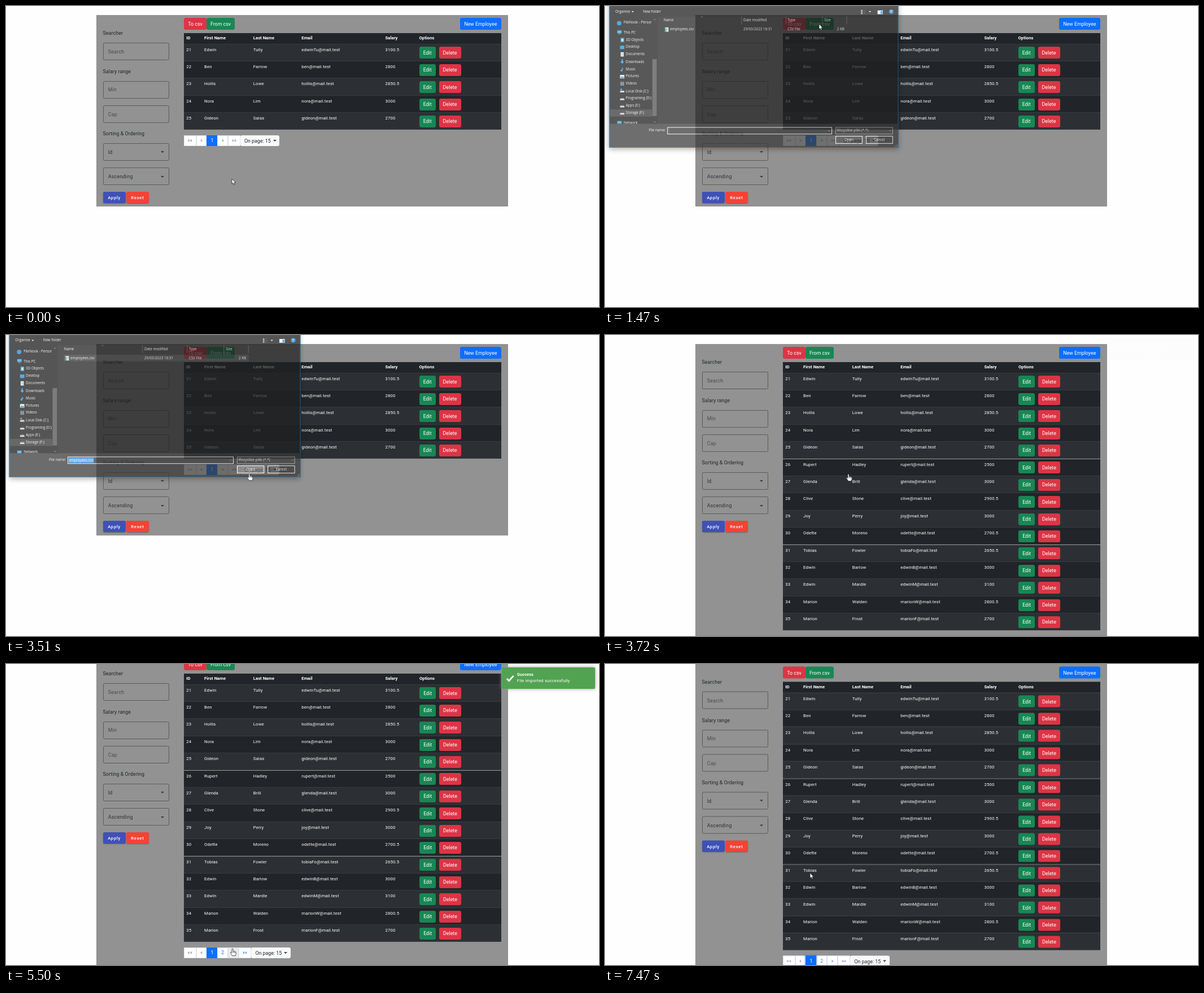
These frames come from a looping animation (1050 px wide and 533 px high, 7540 ms). An HTML page:

```html
<!DOCTYPE html>
<html lang="en">
<head>
<meta charset="utf-8">
<title>Employee import</title>
<style>
html, body { margin: 0; width: 100%; height: 100%; overflow: hidden; background: #fefefe; }
#stage { position: absolute; left: 0; top: 0; width: 1050px; height: 533px; overflow: hidden; font: 8.85px Roboto, sans-serif; color: #212529; }
#page, #dialog, #toast, #cursor { position: absolute; left: 0; top: 0; width: 1050px; }
.t, .b, svg { position: absolute; font-style: normal; font-weight: 400; box-sizing: border-box; }
.t { line-height: 20px; margin-top: -10px; }
.b { display: flex; align-items: center; justify-content: center; }
.right { transform: translateX(-100%); }

#panel { background: #929292; }
.label { letter-spacing: .083px; }
.field { border: .6px solid #5b5b5b; border-radius: 2.2px; }
.hint { letter-spacing: .277px; color: #4b4b4b; }
.value { letter-spacing: .277px; color: #303030; }
.caret { border: 3px solid transparent; border-top-color: #3a3a3a; border-bottom: 0; }
.btn { color: #fff; border-radius: 3.3px; }
.red { background: #dc3545; }
.green { background: #198754; }
.green.hover { background: #157347; }
.blue { background: #0d6efd; }
.mat { color: #fff; font-size: 7.74px; font-weight: 500; letter-spacing: .69px; border-radius: 2.2px; box-shadow: 0 1.5px 1.5px -1px #0003, 0 1px 2px #0003; }
.apply { background: #3f51b5; }
.reset { background: #f44336; }
.cell, .head { color: #fff; font-size: 7.74px; letter-spacing: .138px; }
.head { font-weight: 700; letter-spacing: 0; }
.row { background: #212529; border-bottom: .55px solid #373b3e; }
.row.odd { background: #2c3034; }
.link { background: #fff; border: .55px solid #dee2e6; color: #0d6efd; }
.link.off { color: #6c757d; }
.link.hover { background: #e9ecef; }
.link.on { background: #0d6efd; border-color: #0d6efd; color: #fff; }
.shift .link { color: #6570d8; }
.shift .link.off { color: #747bbd; }
.shift .link.on { color: #fff; box-shadow: 0 0 0 2.2px #0d6efd40; z-index: 1; }
.drop { background: #f8f9fa; border-radius: 3.3px; }

#dialog { height: 533px; transform-origin: 263.5px 95px; font: 6.4px "Open Sans", "Noto Sans", sans-serif; color: #f2f2f2; }
.frame { background: #202020; border: 1px solid #1176bd; box-shadow: 0 3px 9px #0006; }
.bar, .nav { background: #191919; }
.foot { background: #383838; }
.thumb { background: #4d4d4d; }
.mark { background: #333; }
.pick { background: #555; }
.line { background: #555; }
.entry { border: .8px solid #aaa; }
.entry.lit { border-color: #fff; }
.press { border: 1.2px solid #fff; background: #333; }
.press.thin { border-width: .9px; }
.press.hover { background: #666; }
.sel { background: #3297fd; color: #fff; }
.cloud { background: #1b86d8; border-radius: 50%; }
.help { background: #1683d8; border-radius: 50%; font-weight: 700; }
.clip { overflow: hidden; }

.note { background: #51a351; border-radius: 1.7px; box-shadow: 0 0 6.6px #999; }
</style>
</head>
<body>
<div id="stage">
  <div id="page"></div>
  <div id="dialog"></div>
  <div id="toast"></div>
  <div id="cursor"></div>
</div>
<script>
const LOOP = 7540;
const PITCH = 30.4;
const $ = id => document.getElementById(id);

const text = (x, y, s, cls = '') => `<i class="t ${cls}" style="left:${x}px;top:${y}px">${s}</i>`;
const box = (x, y, w, h, cls = '', s = '') =>
  `<b class="b ${cls}" style="left:${x}px;top:${y}px;width:${w}px;height:${h}px">${s}</b>`;
const icon = (x, y, size, shapes) =>
  `<svg style="left:${x}px;top:${y}px" width="${size}" height="${size}" viewBox="0 0 16 16">${shapes}</svg>`;

const parse = s => s.trim().split('\n').map(r => r.trim().split(' '));
const first = parse(`
  Edwin Tully edwinTu 3100.5
  Ben Farrow ben 2800
  Hollis Lowe hollis 2850.5
  Nora Lim nora 3000
  Gideon Salas gideon 2700
  Rupert Hadley rupert 2500
  Glenda Brill glenda 3000
  Clive Stone clive 2900.5
  Joy Perry joy 3000
  Odette Moreno odette 2700.5
  Tobias Fowler tobiaFo 2650.5
  Edwin Barlow edwinB 3000
  Edwin Mardle edwinM 3100
  Marion Walden marionW 2800.5
  Marion Frost marionF 2700`);
const second = parse(`
  Lionel Marsh lionel 2900
  Tessa Quill tessa 3050.5
  Harvey Lunt harvey 2600
  Della Birch della 3000
  Rowan Pike rowan 2750.5
  Ivy Thorne ivy 2800
  Felix Garland felix 3100
  Nadia Crowe nadia 2650
  Percy Holm percy 2950.5
  Wendy Larch wendy 2700`);

const views = {
  few: { rows: first.slice(0, 5), id: 21, page: 1, pages: 1 },
  many: { rows: first, id: 21, page: 1, pages: 2 },
  next: { rows: second, id: 36, page: 2, pages: 2 },
  back: { rows: first, id: 21, page: 1, pages: 2, cls: 'shift' }
};

function sidebar() {
  const fields = [[65.3, 'Search'], [132.7, 'Min'], [176, 'Cap'], [243.2, 'Id'], [286.3, 'Ascending']];
  return text(171.5, 48, 'Searcher', 'label') + text(171.5, 115.7, 'Salary range', 'label') +
    text(171.5, 226, 'Sorting &amp; Ordering', 'label') +
    fields.map(([y, s], i) => box(171.5, y, 117.5, 31, 'field') +
      text(180.7, y + 15.5, s, i < 3 ? 'hint' : 'value') +
      (i < 3 ? '' : box(274.3, y + 14.2, 6, 3, 'caret'))).join('') +
    box(171.5, 329, 40.3, 20, 'mat apply', 'Apply') + box(212.5, 329, 40.7, 20, 'mat reset', 'Reset');
}

function pager(v, y, hover) {
  const labels = ['««', '«', ...Array.from({ length: v.pages }, (_, i) => `${i + 1}`), '»', '»»'];
  let x = 315, out = '';
  labels.forEach((s, i) => {
    const w = s.length > 1 ? 21.5 : 19;
    const off = i < 2 ? v.page === 1 : i >= labels.length - 2 && v.page === v.pages;
    const cls = s === `${v.page}` ? 'on' : off ? 'off' : s === hover ? 'hover' : '';
    out += box(x, y, w, 19, 'link ' + cls, s);
    x += w - (s.length > 1 ? 0 : .1);
  });
  x += v.pages > 1 ? .8 : .2;
  return out + box(x, y, 69.5, 19.3, 'drop') + text(x + 7, y + 10, 'On page: 15') +
    box(x + 57.8, y + 8.6, 5, 2.6, 'caret');
}

function drawPage(name, hover) {
  const v = views[name];
  const end = 67.5 + v.rows.length * PITCH;
  const bottom = end > 313.5 ? end + 41 : 354.5;
  const opt = v.pages > 1 ? 732 : 731.5;
  const cols = [319.3, 351, 437.8, 523.3, 671.6];
  let out = `<b class="b" id="panel" style="left:160px;top:15.5px;width:729px;height:${bottom - 15.5}px"></b>` + sidebar();
  out += box(315, 21, 40, 21, 'btn red', 'To csv') +
    box(355, 21, 50, 21, 'btn green ' + (hover === 'csv' ? 'hover' : ''), 'From csv') +
    box(804, 21, 72.5, 21, 'btn blue', 'New Employee') + box(315, 47.5, 561.5, 20, 'row');
  ['ID', 'First Name', 'Last Name', 'Email', 'Salary', 'Options'].forEach((s, i) => {
    out += text(i < 5 ? cols[i] : opt, 57.3, s, 'head');
  });
  v.rows.forEach(([given, family, box1, pay], i) => {
    const y = 67.5 + i * PITCH;
    out += box(315, y, 561.5, PITCH, i % 2 ? 'row' : 'row odd');
    [v.id + i, given, family, box1 + '@mail.test', pay].forEach((s, k) => out += text(cols[k], y + 10, s, 'cell'));
    out += box(opt, y + 4.8, 29.3, 21, 'btn green', 'Edit') + box(opt + 35, y + 4.8, 39, 21, 'btn red', 'Delete');
  });
  $('page').className = v.cls || '';
  $('page').innerHTML = out + pager(v, end + 9, hover);
}

const disk = '<path d="M3 6h10l2 4H1z" fill="#777"/><path d="M1 9h14v4H1z" fill="#ddd"/>';
const screenIcon = '<path d="M1 2h14v9H1z" fill="#35a7ee"/><path d="M4 13h8v1H4z" fill="#cde"/>';
const places = [
  ['This PC', screenIcon],
  ['3D Objects', '<path d="M3 1h11v14H3z" fill="#2aa5d8"/><path d="M6 5h5v6H6z" fill="#dff6ff"/>'],
  ['Desktop', '<path d="M1 3h14v11H1z" fill="#1692e4"/>'],
  ['Documents', '<path d="M3 1h10v14H3z" fill="#e8eef2"/><path d="M5 5h6M5 8h6M5 11h6" stroke="#4a87a8"/>'],
  ['Downloads', '<path d="M6 1h4v7h4l-6 7-6-7h4z" fill="#2b9df0"/>'],
  ['Music', '<path d="M7 1c1 4 6 4 5 9-1-3-3-3-3-3v5a3 3 0 1 1-2-3z" fill="#2b9df0"/>'],
  ['Pictures', '<path d="M1 3h14v11H1z" fill="#e8eef2"/><path d="M2 12l4-5 4 3 4-2v5H2z" fill="#3189b9"/>'],
  ['Videos', '<path d="M2 2h12v12H2z" fill="#667"/><path d="M4 2v12M12 2v12" stroke="#ccc" stroke-dasharray="2"/><path d="M6 4h4v8H6z" fill="#379"/>'],
  ['Local Disk (C:)', disk + '<path d="M2 1h5v4H2z" fill="#35a7ee"/>'],
  ['Programing (D:)', disk], ['Apps (E:)', disk], ['Storage (F:)', disk]
];
const chevron = (x, y, up) =>
  icon(x, y, 5, `<path d="M2 ${up ? 11 : 5}l6 ${up ? -6 : 6} 6 ${up ? 6 : -6}" fill="none" stroke="#bbb" stroke-width="2"/>`);
const wedge = (x, y) => icon(x, y, 5, '<path d="M1 4h14l-7 8z" fill="#ddd"/>');

function drawDialog(picked, press) {
  let out = box(2.3, -64, 522.7, 318, 'frame') +
    box(3.3, 0, 520.7, 17, 'bar') + box(3.3, 17, 86, 194, 'nav') + box(3.3, 211, 520.7, 42, 'foot') +
    text(13, 8, 'Organise') + wedge(41.5, 6) + text(63, 8, 'New folder') +
    icon(457, 3.5, 9, '<path d="M1 2h4v3H1zm0 5h4v3H1zm0 5h4v3H1zM7 3h2m-2 5h2m-2 5h2M11 3h3m-3 5h3m-3 5h3" fill="#ddd" stroke="#888"/>') +
    wedge(471, 6) + icon(487, 3.5, 10, '<path d="M0 3h16v11H0z" fill="#eee"/><path d="M9 5h6v8H9z" fill="#2290dd"/>') +
    box(507.7, 4, 8, 8, 'help', '?') +
    box(80, 17, 9, 194, 'bar') + box(80.3, 94, 8.2, 103, 'thumb') + chevron(82, 20, 1) + chevron(82, 205) +
    box(15.8, 24.5, 8, 8, 'cloud') + text(28, 28, 'FileNook - Persor') +
    box(3.3, 185.3, 76.7, 12.8, 'mark');
  places.forEach(([s, shapes], i) => {
    const y = 45.6 + i * 13.25;
    out += icon(i ? 20.5 : 16, y - 4.3, 9, shapes) + text(i ? 32 : 28, y, s);
  });
  out += box(3.3, 199, 76, 12, 'clip', icon(12.5, 5.5, 9, screenIcon) + text(24.7, 10, 'Network'));
  if (picked) out += box(99.5, 34.3, 332, 12, picked > 1 ? 'mark' : 'pick');
  [['Name', 100.5], ['Date modified', 244.7], ['Type', 324.5], ['Size', 391]].forEach(([s, x]) => out += text(x, 24, s));
  [241, 320.5, 387, 431.3].forEach(x => out += box(x, 17, .7, 14, 'line'));
  out += chevron(167, 15, 1) +
    icon(101.5, 35.5, 9, '<path d="M2 1h11v14H2z" fill="#d9edf2"/><path d="M1 4h5v11H1z" fill="#4aa06c"/><path d="M7 4h5M7 7h5M7 10h5" stroke="#3e93b5"/>') +
    text(112, 40.3, 'employees.csv') + text(244.7, 40.3, '29/03/2023 16:31') + text(324.5, 40.3, 'CSV File') +
    text(427.3, 40.3, '2 KB', 'right') +
    text(104, 223, 'File name:', 'right') + box(107.3, 216.5, 297.5, 13.3, 'entry lit') + chevron(397, 221) +
    (picked ? box(109, 219, 44.5, 8.6, 'sel', 'employees.csv') : box(109.5, 219, .6, 8.5, 'line')) +
    box(411, 216.5, 104, 13.3, 'entry') + text(413.5, 223, 'Wszystkie pliki (*.*)') + chevron(507.5, 221) +
    box(411, 232.8, 49, 14, 'press ' + (press ? 'hover' : ''), 'Open') + box(466, 232.8, 49, 14, 'press thin', 'Cancel') +
    icon(518, 247, 6, '<path d="M14 2v2M14 7v2M9 7v2M14 12v2M9 12v2M4 12v2" stroke="#bbb" stroke-width="3"/>');
  $('dialog').innerHTML = out;
}

const pointers = {
  arrow: '<path d="M0 0v9.3l2.1-1.9 1.5 3.4 1.6-.7-1.5-3.3h2.9z"/>',
  hand: '<path d="M-1.1 1.2a1.1 1.1 0 0 1 2.2 0v3.3q1.6-.5 2 .4 1.4-.3 1.7.5 1.5-.1 1.5 1.3v2.6l-1.2 3.4h-5.3l-2.8-4.3q-1.2-1.7-.1-2.1 1-.3 2 1.3z"/><path d="M1.2 5v2.2M3 5.5v2M4.7 6v1.6"/>'
};
function drawCursor(kind) {
  $('cursor').innerHTML = `<svg width="1" height="1" overflow="visible" fill="#fff" stroke="#111" stroke-width=".7">${pointers[kind]}</svg>`;
}

$('toast').innerHTML = box(877.7, 6, 165.5, 38, 'note') +
  icon(885, 18, 15, '<path d="M2 8.5l4 4.3L14.5 3" fill="none" stroke="#fff" stroke-width="3"/>') +
  text(904.8, 19, 'Success', 'head') + text(904.8, 29.7, 'File imported successfully', 'cell');

// Each stop is [ms, ...values].
const smooth = k => k * k * (3 - 2 * k);
const flat = k => k;
function at(stops, t, ease = smooth) {
  const i = stops.findIndex(s => s[0] > t);
  if (i < 0) return stops[stops.length - 1].slice(1);
  if (!i) return stops[0].slice(1);
  const a = stops[i - 1], b = stops[i], k = ease((t - a[0]) / (b[0] - a[0]));
  return a.slice(1).map((v, n) => v + (b[n + 1] - v) * k);
}
const within = (t, ...spans) => spans.some(([a, b]) => t >= a && t < b);

const path = [
  [70, 400, 306], [790, 361, 28], [860, 362, 28], [1020, 389, 30], [1200, 379, 32], [1500, 379, 32],
  [2000, 168, 55], [2230, 168, 55], [2340, 140, 41], [2480, 140, 41], [2930, 430, 243], [3510, 430.7, 245],
  [3720, 431, 246], [3860, 442, 266], [4200, 567.5, 306], [4720, 567.5, 306], [5230, 404, 508], [5370, 404, 508],
  [5500, 401, 504], [5720, 401, 504], [6190, 388, 510], [6860, 361, 375], [6940, 363, 370]
];
const dialogMove = [
  [1390, 0, .95], [1470, .72, .979], [1600, 1, 1], [3440, 1, 1], [3510, .74, .987], [3600, 0, .95]
];
const toastFade = [[3720, 0], [3830, 1], [5780, 1], [5950, 0]];
const scroll = [[4440, 0], [4720, 31], [5700, 31], [5700, 16.5]];

const drawn = {};
function update(draw, ...args) {
  const key = args.join();
  if (drawn[draw.name] === key) return;
  drawn[draw.name] = key;
  draw(...args);
}

const start = performance.now();
function tick() {
  const t = (performance.now() - start) % LOOP;
  const view = t < 3720 ? 'few' : t < 5700 ? 'many' : t < 7370 ? 'next' : 'back';
  const hover = within(t, [740, 1600]) ? 'csv' : within(t, [5200, 5700]) ? '»' : within(t, [6900, 7370]) ? '1' : '';
  update(drawPage, view, hover);
  update(drawDialog, t < 2420 ? 0 : t < 2900 ? 1 : 2, within(t, [2880, 3600]));
  update(drawCursor, within(t, [740, 1400], [3480, 3760], [5200, 5700], [6880, 7370]) ? 'hand' : 'arrow');

  const [x, y] = at(path, t);
  $('cursor').style.transform = `translate(${x}px,${y}px)`;
  $('page').style.transform = `translateY(${-at(scroll, t)[0]}px)`;
  const [alpha, size] = at(dialogMove, t, flat);
  $('dialog').style.opacity = alpha;
  $('dialog').style.transform = `scale(${size})`;
  $('toast').style.opacity = at(toastFade, t, flat)[0];
  requestAnimationFrame(tick);
}
tick();
</script>
</body>
</html>
```
